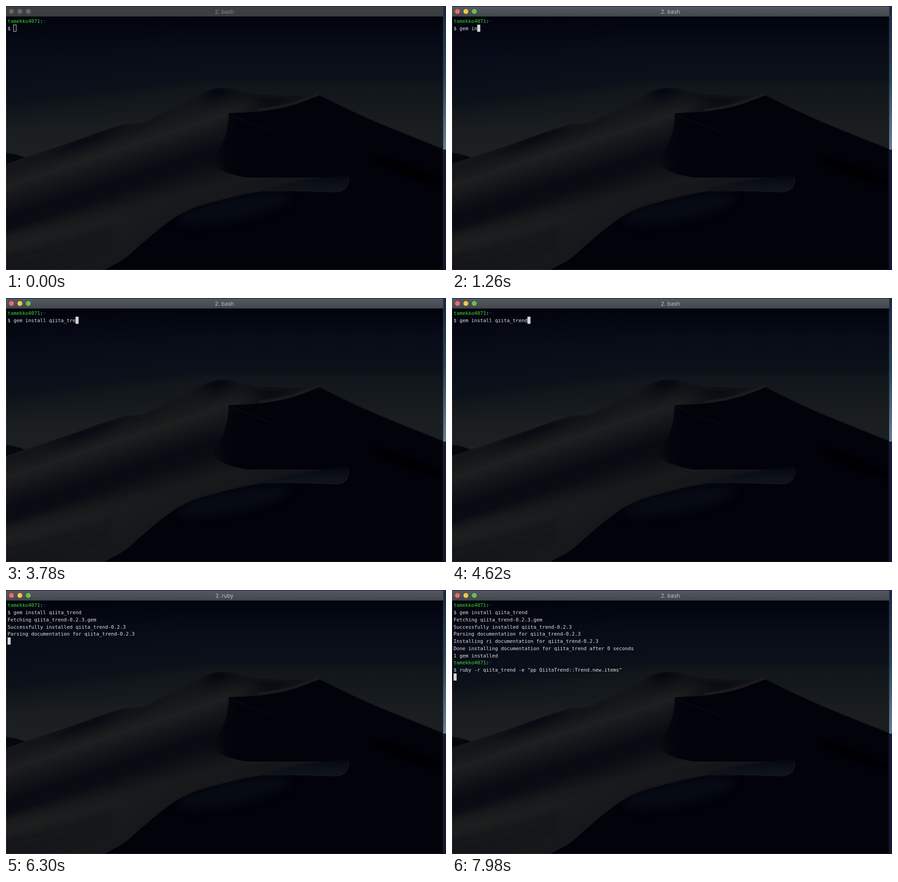
Animation of 968 by 579 pixels, one loop 8000 ms. Source, as an HTML page with a canvas:

```html
<!DOCTYPE html>
<html lang="en">
<head>
<meta charset="utf-8">
<title>Terminal</title>
<style>
html, body { margin: 0; width: 100%; height: 100%; overflow: hidden; background: #03040b; }
canvas { display: block; }
</style>
</head>
<body>
<canvas id="stage" width="968" height="579"></canvas>
<script>
const W = 968, H = 579, LOOP = 8000, EDGE = 962, BAR = 23;
const ctx = document.getElementById('stage').getContext('2d');
const COL = 6.5, ROW = 15.78, LEFT = 3.5;
const USER = 'tamekko4071';
const INSTALL = 'gem install qiita_trend';
const RUN = 'ruby -r qiita_trend -e "pp QiitaTrend::Trend.new.items"';
const OUTPUT = [
  [6160, 'Fetching qiita_trend-0.2.3.gem'],
  [6300, 'Successfully installed qiita_trend-0.2.3'],
  [6300, 'Parsing documentation for qiita_trend-0.2.3'],
  [6370, 'Installing ri documentation for qiita_trend-0.2.3'],
  [6440, 'Done installing documentation for qiita_trend after 0 seconds'],
  [6440, '1 gem installed']
];
const T = { focus: 280, enter: 5530, ruby: 5810, prompt: 6580, recall: 7210, run: 7910 };

// Smooth height y(x) through a few key points.
function spline(...pts) {
  const slope = (a, b) => (b[1] - a[1]) / (b[0] - a[0]);
  const at = i => pts[Math.min(pts.length - 1, Math.max(0, i))];
  return x => {
    const next = pts.findIndex(p => p[0] > x);
    const i = next < 0 ? pts.length - 2 : Math.max(0, next - 1);
    const a = pts[i], b = pts[i + 1], w = b[0] - a[0];
    const u = Math.min(1, Math.max(0, (x - a[0]) / w));
    const ma = slope(at(i - 1), b) * w, mb = slope(a, at(i + 2)) * w;
    const v = 1 - u;
    return a[1] * v * v * (1 + 2 * u) + b[1] * u * u * (3 - 2 * u) + ma * u * v * v - mb * u * u * v;
  };
}

const ridge = spline([0, 346], [130, 303], [260, 259], [300, 255], [460, 181], [560, 194], [690, 197]);
const crest = spline([490, 235], [560, 231], [625, 219], [690, 196]);
const flank = spline([690, 196], [800, 248], [962, 314]);
const front = spline([216, 579], [262, 553], [300, 520], [345, 483], [390, 453],
  [440, 434], [570, 406], [730, 408]);

const band = x => 395 - .327 * x;
const shadow = x => 465 - .33 * x;
const lit = x => 525 - .245 * x;
const bump = (x, mid, width) => Math.exp(-(((x - mid) / width) ** 2));

// Sand colour from shade (0) to moonlight (1).
function tone(v) {
  const mix = (a, b) => Math.round(a + (b - a) * v);
  return `rgb(${mix(4, 31)},${mix(7, 32)},${mix(15, 32)})`;
}

function gradient(c, x0, y0, x1, y1, ...colors) {
  const g = c.createLinearGradient(x0, y0, x1, y1);
  colors.forEach((color, i) => g.addColorStop(i / (colors.length - 1), color));
  return g;
}

// One pixel column shaded through [y, colour] stops.
function column(c, x, stops) {
  const top = stops[0][0], bottom = Math.max(top + 1, stops[stops.length - 1][0]);
  const g = c.createLinearGradient(0, top, 0, bottom);
  let p = 0;
  for (const [y, color] of stops) {
    p = Math.min(1, Math.max(p, (y - top) / (bottom - top)));
    g.addColorStop(p, color);
  }
  c.fillStyle = g;
  c.fillRect(x, top, 1, bottom - top);
}

function trace(path, f, x0, x1) {
  for (let x = x0; x <= x1; x += 2) path.lineTo(x, f(x));
  return path;
}

function paintSky(c) {
  for (let x = 0; x < W; x++) {
    const drop = 55 * Math.max(0, 1 - x / 450);
    column(c, x, [[BAR, '#01040d'], [90 + drop / 2, '#080c18'], [155 + drop, '#0b1019'],
      [175 + drop, '#11161b'], [275, '#1a1e20'], [340, '#1d2020']]);
  }
  c.fillStyle = '#2c303a';
  for (const [x, y] of [[247, 46], [330, 141], [203, 156]]) c.fillRect(x, y, 1, 1);
}

function paintSlope(c) {
  for (let x = 0; x < 690; x++) {
    const top = .55 - .4 * bump(x, 180, 80) - .5 * bump(x, 465, 35) - .25 * bump(x, 590, 70);
    const light = .95 - .8 * bump(x, 590, 60);
    const y = ridge(x);
    column(c, x, [[y, tone(top + .08)], [y + 9, tone(top)], [band(x) - 14, tone(light * .8)],
      [band(x), tone(light)], [band(x) + 35, tone(.5)], [shadow(x), tone(.16)],
      [shadow(x) + 25, tone(.2)], [lit(x) - 20, tone(.72)], [lit(x), tone(.95 - x * .0006)],
      [front(x), tone(.65)]]);
  }
}

function paintScene() {
  const cv = document.createElement('canvas');
  cv.width = W; cv.height = H;
  const c = cv.getContext('2d');
  const soft = (blur, draw) => {
    c.save();
    c.filter = `blur(${blur}px)`;
    draw();
    c.restore();
  };
  const fill = (style, blur, path) => soft(blur, () => { c.fillStyle = style; c.fill(path); });
  const line = (style, width, blur, path) => soft(blur, () => {
    c.strokeStyle = style; c.lineWidth = width; c.stroke(path);
  });
  const blob = (style, blur, ...shape) => {
    const path = new Path2D();
    path.ellipse(...shape, 0, Math.PI * 2);
    fill(style, blur, path);
  };

  paintSky(c);
  blob('#04070c', 1, 0, 336, 55, 14, .15);
  paintSlope(c);
  for (let i = 0; i < 3; i++) {
    const y = 553 + i * 19;
    line(tone(.5), 7, 5, new Path2D(`M-10 ${y}Q100 ${y - 18} 230 ${y - 62}`));
  }

  // Shaded face with its moonlit upper edge.
  line(tone(.85), 6, 1.5, trace(new Path2D(), x => crest(x) - 3, 556, 690));
  const face = trace(trace(new Path2D(), crest, 490, 690), flank, 692, EDGE);
  face.lineTo(W, 317);
  face.lineTo(W, 376);
  face.lineTo(530, 376);
  face.quadraticCurveTo(450, 362, 455, 335);
  face.quadraticCurveTo(488, 300, 490, 235);
  fill(gradient(c, 452, 0, 510, 0, '#03040b00', '#03040bcc', '#02020b'), .6, face);
  line(tone(.5), 1.2, .8, new Path2D('M496 239Q540 259 595 277'));
  line('#0c0e16', 1.2, .8, new Path2D('M715 335Q770 362 832 390'));
  line(tone(.5), 1.3, .8, trace(new Path2D(), flank, 690, EDGE));

  // Foreground dune under its curled crest.
  const dune = trace(new Path2D(), front, 216, 726);
  dune.quadraticCurveTo(758, 405, 754, 374);
  dune.lineTo(W, 360);
  dune.lineTo(W, H);
  dune.lineTo(216, H);
  const lip = new Path2D('M500 424Q600 382 754 370Q758 408 726 408Q600 402 500 424');
  fill(gradient(c, 0, 368, 0, 410, '#03050d', '#0b1018', '#11161b'), 2.5, lip);
  fill('#02020b', .6, dune);
  c.save();
  c.clip(dune);
  blob('#060b13', 10, 500, 445, 125, 24, -.2);
  c.restore();
  blob('#000003', 4, 885, 362, 85, 13, .36);
  line(tone(.55), 1.2, .8, trace(new Path2D(), front, 380, 560));
  line(tone(.85), 1.2, .7, new Path2D('M570 406Q650 404 726 408Q757 405 754 376'));

  // Desktop around the window.
  c.fillStyle = '#1a2438';
  c.fillRect(0, 0, W, 2);
  c.fillStyle = gradient(c, 0, 0, 0, 315, '#1a2840', '#2f4360', '#667d9c');
  c.fillRect(EDGE, 0, W - EDGE, 315);
  c.fillStyle = '#121830';
  c.fillRect(EDGE, 315, W - EDGE, H - 315);
  c.strokeStyle = 'rgba(130,136,148,.22)';
  c.strokeRect(.5, 1.5, EDGE - 1, H - 2);
  return cv;
}

const scene = paintScene();

function drawBar(t) {
  const active = t >= T.focus;
  ctx.fillStyle = active ? gradient(ctx, 0, 2, 0, BAR, '#545860', '#43474d') : '#3c3e3f';
  ctx.beginPath();
  ctx.roundRect(0, 1.5, EDGE, BAR - 1.5, [4, 4, 0, 0]);
  ctx.fill();
  ['#ee6a5f', '#edca48', '#65c24c'].forEach((color, i) => {
    ctx.fillStyle = active ? color : '#636566';
    ctx.beginPath();
    ctx.arc(12 + i * 18.5, 12, 5.4, 0, Math.PI * 2);
    ctx.fill();
  });
  ctx.font = '12px Inter, "Open Sans", sans-serif';
  ctx.textAlign = 'center';
  ctx.fillStyle = active ? '#c0c2c5' : '#858788';
  ctx.fillText(t >= T.ruby && t < T.recall ? '2. ruby' : '2. bash', 480.5, 17);
  ctx.textAlign = 'left';
}

function print(row, col, text, color = '#e2e2e2') {
  ctx.fillStyle = color;
  ctx.fillText(text, LEFT + col * COL, 37.2 + row * ROW);
}

function prompt(row, command) {
  print(row, 0, USER, '#44d62c');
  print(row, USER.length, ':');
  print(row, USER.length + 1, '~', '#2a36b0');
  print(row + 1, 0, '$ ' + command);
}

function typed(t) {
  const n = t < 2600 ? 1 + (t - 530) / 133 : 16 + (t - 2471) / 238;
  return INSTALL.slice(0, Math.max(0, Math.floor(n)));
}

function drawCursor(row, col, solid) {
  const x = LEFT + col * COL, y = 25.2 + row * ROW;
  ctx.fillStyle = ctx.strokeStyle = '#d6d6d6';
  if (solid) ctx.fillRect(x, y, 6.7, 15.6);
  else ctx.strokeRect(Math.round(x) - .5, Math.round(y) + .5, 6, 14);
}

function draw(t) {
  ctx.drawImage(scene, 0, 0);
  drawBar(t);
  ctx.font = '10.8px "DejaVu Sans Mono", "Liberation Mono", monospace';
  const command = typed(t);
  prompt(0, command);
  let row = 1, col = 2 + command.length;
  if (t >= T.enter) {
    const shown = OUTPUT.filter(([at]) => t >= at);
    shown.forEach(([, text], i) => print(2 + i, 0, text));
    row = 2 + shown.length;
    col = 0;
  }
  if (t >= T.prompt) {
    const next = t >= T.recall ? RUN : '';
    prompt(row, next);
    row++;
    col = 2 + next.length;
  }
  if (t >= T.run) {
    row++;
    col = 0;
  }
  drawCursor(row, col, t >= T.focus);
}

const start = performance.now();
function tick() {
  draw((performance.now() - start) % LOOP);
  requestAnimationFrame(tick);
}
tick();
</script>
</body>
</html>
```
